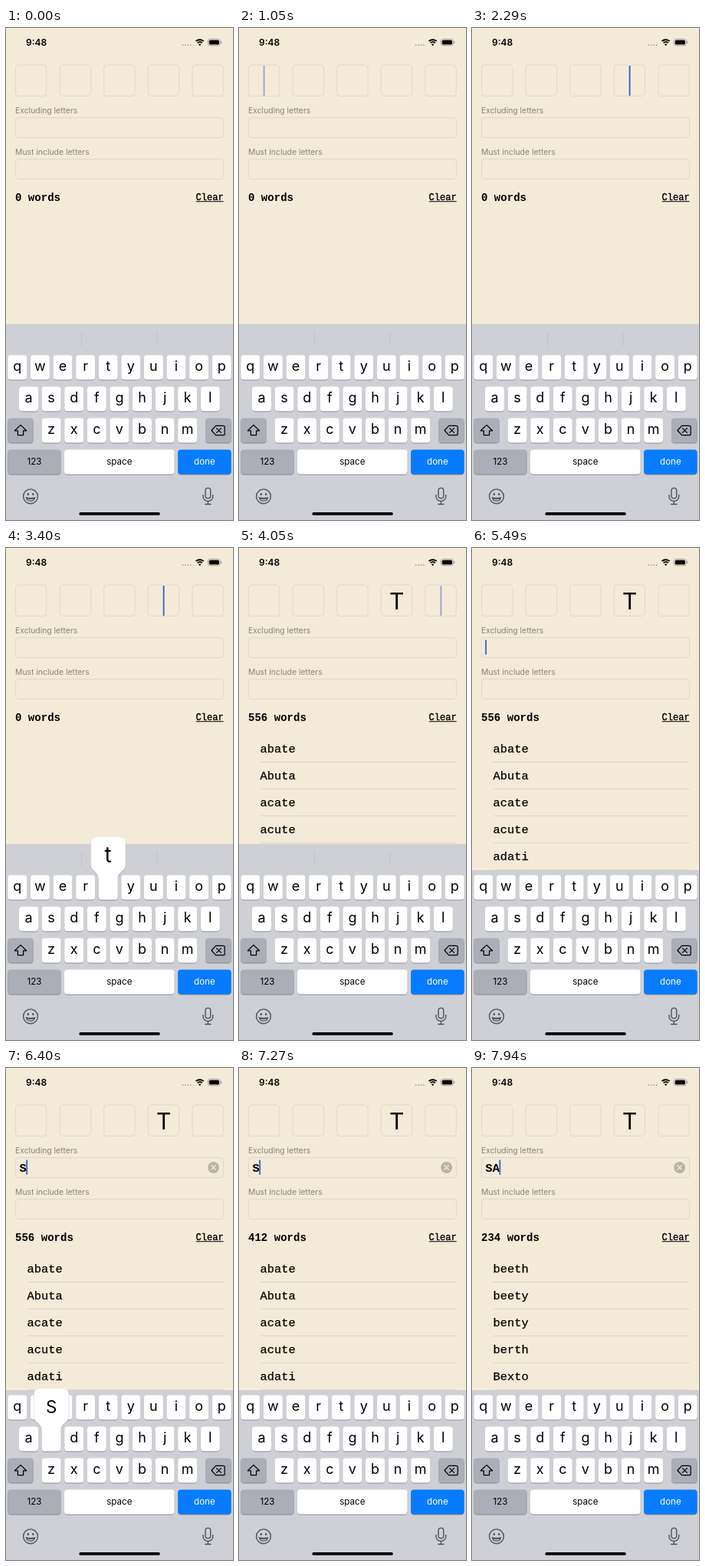
An HTML page for the animation above (8 s loop, 296x640 px).

```html
<!DOCTYPE html>
<html lang="en">
<head>
<meta charset="utf-8">
<title>Word finder</title>
<style>
html, body { margin: 0; width: 100%; height: 100%; overflow: hidden; background: #f3ebd8; }
svg { display: block; width: 100vw; height: 100vh; }
text { font-family: Inter, Roboto, sans-serif; white-space: pre; }
.mono { font-family: "Liberation Mono", "DejaVu Sans Mono", monospace; }
</style>
</head>
<body>
<svg id="stage" viewBox="0 0 296 640">
  <rect width="296" height="640" fill="#f3ebd8"/>
  <g id="form"></g>
  <g id="list"></g>
  <rect id="cursor" width="1.9" rx=".6" fill="#3b62d3"/>
  <g id="keyboard"></g>
  <g id="popup"></g>
</svg>
<script>
const LOOP = 8000;
const $ = id => document.getElementById(id);
const form = $('form'), list = $('list'), cursor = $('cursor'), keyboard = $('keyboard'), popup = $('popup');

function add(parent, tag, attrs, content) {
  const el = document.createElementNS('http://www.w3.org/2000/svg', tag);
  for (const name in attrs) el.setAttribute(name, attrs[name]);
  if (content !== undefined) el.textContent = content;
  parent.appendChild(el);
  return el;
}
const text = (parent, x, y, size, content, attrs = {}) =>
  add(parent, 'text', { x, y, 'font-size': size, ...attrs }, content);
const rect = (parent, x, y, width, height, fill, rx = 0, attrs = {}) =>
  add(parent, 'rect', { x, y, width, height, fill, rx, ...attrs });
const path = (parent, d, attrs = {}) =>
  add(parent, 'path', { d, fill: 'none', stroke: '#000', ...attrs });
const show = (el, on) => el.setAttribute('visibility', on ? 'visible' : 'hidden');

const middle = { 'text-anchor': 'middle' };
const mono = { class: 'mono' };
const bold = { class: 'mono', 'font-weight': 700 };
const boxX = i => 12.5 + 57.6 * i;

// Status bar
text(form, 26, 23, 12, '9:48', { 'font-weight': 600 });
for (let i = 0; i < 4; i++) add(form, 'circle', { cx: 230.5 + 3.4 * i, cy: 22.2, r: 0.9, fill: '#aaa498' });
path(form, 'M247.6 17.2a7.6 7.6 0 0 1 10.2 0M249.6 19.4a4.8 4.8 0 0 1 6.2 0', { 'stroke-width': 1.8 });
path(form, 'M252.7 23.2l-1.7-1.9a2.6 2.6 0 0 1 3.4 0z', { fill: '#000', stroke: 'none' });
rect(form, 263.4, 14.4, 16, 8.4, 'none', 2.6, { stroke: '#99948a', 'stroke-width': 0.8 });
rect(form, 264.8, 15.8, 13.2, 5.6, '#000', 1.5);
path(form, 'M280.7 17.2v2.8', { stroke: '#99948a', 'stroke-width': 1 });

// Form
const outline = { stroke: '#e0d8c6', 'stroke-width': 1 };
for (let i = 0; i < 5; i++) rect(form, boxX(i), 48, 40.4, 40.6, 'none', 4, outline);
[[111, 116.5, 'Excluding letters'], [165, 170.5, 'Must include letters']].forEach(([y, top, label]) => {
  text(form, 12, y, 10.4, label, { fill: '#89857b' });
  rect(form, 12.5, top, 271, 26, 'none', 4, outline);
});
const letter = text(form, 205.6, 80, 30, 'T', middle);
const excluded = text(form, 17.6, 135, 15.4, '', bold);
const clearIcon = add(form, 'g', {});
add(clearIcon, 'circle', { cx: 270.6, cy: 129.5, r: 7.4, fill: '#b9b3a6' });
path(clearIcon, 'M267.9 126.8l5.4 5.4m0-5.4l-5.4 5.4', { stroke: '#f3ebd8', 'stroke-width': 1.3, 'stroke-linecap': 'round' });
const count = text(form, 12, 224.5, 14.05, '', bold);
text(form, 247.6, 223.5, 12, 'Clear', { ...mono, stroke: '#000', 'stroke-width': 0.35 });
rect(form, 247.8, 225.2, 35.8, 1, '#000');

// Word list
const rows = Array.from({ length: 5 }, (_, i) => {
  rect(list, 28, 278 + 35.1 * i, 256, 0.8, '#d9d1c0');
  return text(list, 27.6, 266 + 35.1 * i, 15.4, '', { ...mono, stroke: '#000', 'stroke-width': 0.25 });
});

// Keyboard
const board = rect(keyboard, 0, 385, 296, 255, '#cfd0d5');
const bar = add(keyboard, 'g', {});
[98.5, 197].forEach(x => rect(bar, x - 0.4, 395, 0.8, 19, '#bcbdc3'));

const PITCH = 29.6, KEY_W = 25, KEY_H = 32;
const rowY = r => 425.5 + 41 * r;
const keyX = {};
function key(x, r, width, fill = '#fff') {
  rect(keyboard, x, rowY(r) + 0.9, width, KEY_H, '#8b8c90', 3.8);
  rect(keyboard, x, rowY(r), width, KEY_H, fill, 3.8);
}
[['qwertyuiop', 2.3], ['asdfghjkl', 17], ['zxcvbnm', 46.6]].forEach(([chars, left], r) =>
  [...chars].forEach((c, i) => {
    const x = left + PITCH * i;
    keyX[c] = [x, rowY(r)];
    key(x, r, KEY_W);
    text(keyboard, x + KEY_W / 2, rowY(r) + 20.8, 18, c, middle);
  }));
key(2.3, 2, 33.4, '#abaeb7');
key(260.2, 2, 33.4, '#abaeb7');
path(keyboard, 'M19 516.4l7.6 7.4h-4v5.8h-7.2v-5.8h-4z', { 'stroke-width': 1.2, 'stroke-linejoin': 'round' });
path(keyboard, 'M273.6 517.3h9.6q2 0 2 2v8.4q0 2-2 2h-9.6l-5.6-6.2zM274.6 520.6l5.8 5.8m0-5.8l-5.8 5.8',
  { 'stroke-width': 1.2, 'stroke-linejoin': 'round', 'stroke-linecap': 'round' });
[[2.3, 69.4, '#abaeb7', '#000', '123'], [76, 143.6, '#fff', '#000', 'space'], [224.2, 69.4, '#067bfe', '#fff', 'done']]
  .forEach(([x, width, fill, ink, label]) => {
    key(x, 3, width, fill);
    text(keyboard, x + width / 2, 568, 11.6, label, { ...middle, fill: ink });
  });

const gray = { stroke: '#505257', 'stroke-width': 1.4, 'stroke-linecap': 'round' };
add(keyboard, 'circle', { cx: 32, cy: 609.3, r: 9.4, fill: 'none', ...gray });
[28.8, 35.2].forEach(cx => add(keyboard, 'ellipse', { cx, cy: 606.4, rx: 1.2, ry: 1.7, fill: '#505257' }));
path(keyboard, 'M26.4 610.8q5.6 1.6 11.2 0a5.7 5.4 0 0 1-11.2 0z', { ...gray, 'stroke-width': 1.2 });
path(keyboard, 'M27 612q5 1.5 10 0', { ...gray, 'stroke-width': 1.2 });
rect(keyboard, 260, 598.4, 6.8, 13.4, 'none', 3.4, gray);
path(keyboard, 'M257 607.4v2a6.4 6 0 0 0 12.8 0v-2M263.4 615.4v4M259.8 619.5h7.2', gray);
rect(keyboard, 95.4, 630, 105.4, 3.8, '#000', 1.9);

// Enlarged key, relative to the top left of its key
const balloon = 'M0 28.6V5.5C0-6-10.2-4-10.2-14V-41.5q0-8 8-8H27.2q8 0 8 8V-14C35.2-4 25-6 25 5.5V28.6q0 3.4-3.4 3.4H3.4Q0 32 0 28.6z';
path(popup, balloon, { fill: '#85868c', stroke: '#85868c', 'stroke-width': 0.8, opacity: 0.45, transform: 'translate(0 .6)' });
path(popup, balloon, { fill: '#fff', stroke: 'none' });
const popupChar = text(popup, 12.5, 0, 28, '', middle);

// Timeline: each entry holds from its time until the next one
const FIELD = [119.6, 19.2], BOX = [49, 39];
const cursorSteps = [
  [0, 0, BOX, 0],
  [110, 31.7, BOX, 1], [690, 31.7, BOX, 0.5], [810, 31.7, BOX, 0], [1050, 31.7, BOX, 0.5], [1160, 31.7, BOX, 1],
  [1700, 31.7, BOX, 0.75],
  [2290, 204.7, BOX, 1], [2640, 204.7, BOX, 0.5], [2750, 204.7, BOX, 0], [3290, 204.7, BOX, 0.5], [3400, 204.7, BOX, 1],
  [3540, 262.4, BOX, 1], [4050, 262.4, BOX, 0.5], [4170, 262.4, BOX, 0], [4410, 262.4, BOX, 0.5], [4530, 262.4, BOX, 1],
  [4970, 262.4, BOX, 0.75],
  [5490, 17.2, FIELD, 1], [5860, 17.2, FIELD, 0.5], [5970, 17.2, FIELD, 0], [6290, 17.2, FIELD, 0.5],
  [6400, 26.2, FIELD, 1], [6910, 26.2, FIELD, 0.5], [7020, 26.2, FIELD, 0], [7270, 26.2, FIELD, 1],
  [7540, 35.4, FIELD, 1]
];
const popupSteps = [[0, ''], [3290, 't'], [3540, ''], [6290, 'S'], [6910, ''], [7430, 'A'], [7540, '']];
const excludedSteps = [[0, ''], [6400, 'S'], [7540, 'SA']];
const countSteps = [[0, 0], [4050, 556], [7020, 412], [7540, 234]];
const wordSteps = [
  [0, ''],
  [4050, 'abate Abuta acate acute adati'],
  [7540, 'beeth beety benty berth Bexto']
];
const at = (steps, t) => steps.filter(s => s[0] <= t).pop();

function draw(t) {
  const [, x, [top, height], alpha] = at(cursorSteps, t);
  cursor.setAttribute('x', x);
  cursor.setAttribute('y', top);
  cursor.setAttribute('height', height);
  cursor.setAttribute('opacity', alpha);

  show(letter, t >= 3540);
  const typed = at(excludedSteps, t)[1];
  excluded.textContent = typed;
  show(clearIcon, typed !== '');
  count.textContent = at(countSteps, t)[1] + ' words';

  const words = at(wordSteps, t)[1].split(' ');
  show(list, t >= 4050);
  rows.forEach((row, i) => { row.textContent = words[i] || ''; });
  rows[0].setAttribute('opacity', t >= 7540 && t < 7940 ? 0.85 : 1);

  const compact = t >= 5490;
  board.setAttribute('y', compact ? 419 : 385);
  show(bar, !compact);

  const char = at(popupSteps, t)[1];
  show(popup, char !== '');
  if (char) {
    const lower = char.toLowerCase();
    popup.setAttribute('transform', `translate(${keyX[lower]})`);
    popupChar.textContent = char;
    popupChar.setAttribute('font-size', char === lower ? 28 : 22.5);
    popupChar.setAttribute('y', char === lower ? -17 : -17.2);
  }
}

const start = performance.now();
function tick() {
  draw((performance.now() - start) % LOOP);
  requestAnimationFrame(tick);
}
tick();
</script>
</body>
</html>
```
